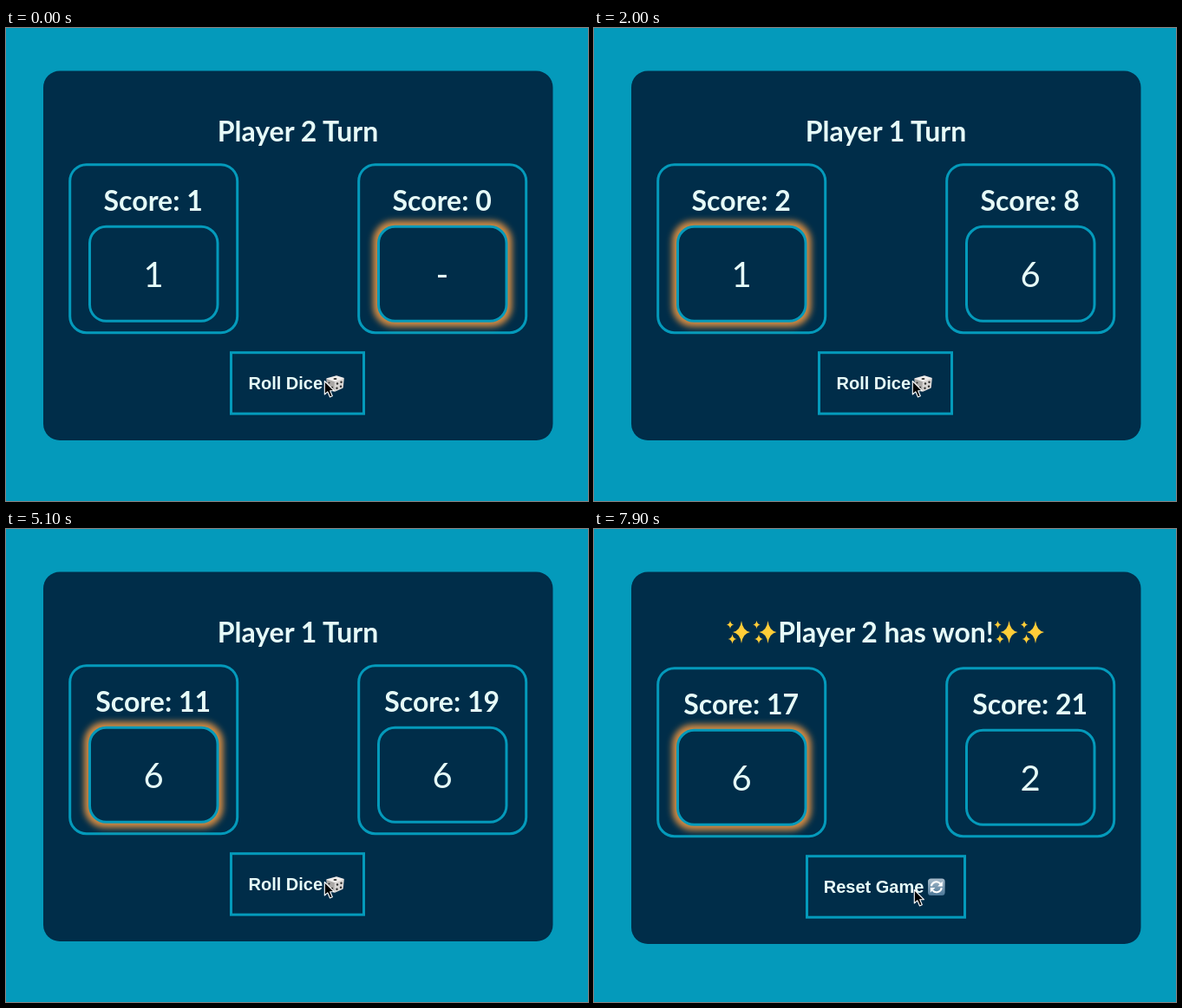
An HTML page for the animation above (8000 ms loop, 671 by 546 pixels).

```html
<!DOCTYPE html>
<html lang="en">
<head>
<meta charset="utf-8">
<title>Dice game</title>
<style>
  html, body { margin: 0; width: 100%; height: 100%; overflow: hidden; background: #049abb; }
  svg { display: block; }
  text { fill: #e6fbf8; text-anchor: middle; font: bold 32px Lato, sans-serif; }
  .die { font-weight: 400; font-size: 40px; }
  .label { font: bold 20px "Liberation Sans", Arial, sans-serif; text-anchor: start; }
  .line { fill: #002d49; stroke: #049abb; stroke-width: 3; }
  .glow { fill: #d18a42; filter: url(#blur); }
</style>
</head>
<body>
<svg width="671" height="546" viewBox="0 0 671 546">
  <defs>
    <filter id="blur" x="-20%" y="-20%" width="140%" height="140%"><feGaussianBlur stdDeviation="3.6"/></filter>
    <linearGradient id="steel" x2="0" y2="1"><stop stop-color="#a9bccb"/><stop offset="1" stop-color="#4c7798"/></linearGradient>
    <path id="star" d="M0-13Q1.5-1.5 10 0Q1.5 1.5 0 13Q-1.5 1.5-10 0Q-1.5-1.5 0-13Z"/>
    <g id="sparkle" fill="#ffcd38">
      <use href="#star"/>
      <use href="#star" transform="translate(-13 -8.5) scale(.42 .36)"/>
      <use href="#star" transform="translate(-10.5 8) scale(.5 .42)"/>
    </g>
    <g id="player">
      <rect class="line" x="73.7" y="157.7" width="193" height="194" rx="19"/>
    </g>
  </defs>

  <rect id="card" x="43" y="49.5" width="587.5" height="426.5" rx="19" fill="#002d49"/>
  <text id="title" x="336.5" y="130.5"></text>
  <g id="sparkles">
    <use href="#sparkle" x="170" y="119"/><use href="#sparkle" x="200.5" y="119"/>
    <use href="#sparkle" x="478.5" y="119"/><use href="#sparkle" x="509" y="119"/>
  </g>

  <g id="board">
    <g class="player"></g>
    <g class="player" transform="translate(333)"></g>

    <g id="roll">
      <rect class="line" x="259.5" y="374.7" width="153" height="70.5"/>
      <text class="label" x="279.5" y="417">Roll Dice</text>
      <g stroke-linejoin="round" stroke-width="1.5">
        <path d="M370 405L381 402L389 404.5L379 408.5Z" fill="#f0eeec" stroke="#f0eeec"/>
        <path d="M370 406L378.500 409L378 419L371 414Z" fill="#aaa7a5" stroke="#aaa7a5"/>
        <path d="M379.500 409L389 405.500L388 415L379 419Z" fill="#d8d5d3" stroke="#d8d5d3"/>
      </g>
      <g fill="#30302f">
        <ellipse cx="379.500" cy="405" rx="2" ry="1"/>
        <circle cx="372.500" cy="409.500" r="1.100"/><circle cx="376" cy="414.800" r="1.100"/>
        <circle cx="382" cy="410.500" r="1.200"/><circle cx="386.500" cy="408.800" r="1.200"/>
        <circle cx="381.500" cy="415.800" r="1.200"/><circle cx="386" cy="413.800" r="1.200"/>
      </g>
    </g>

    <g id="reset">
      <rect class="line" x="245.5" y="374.7" width="182" height="70.5"/>
      <text class="label" x="264.7" y="417">Reset Game</text>
      <g transform="translate(394.8 410.3)">
        <rect x="-9.8" y="-9.800" width="19.600" height="19.600" rx="3.500" fill="url(#steel)"/>
        <g id="arrow">
          <path d="M-6-1A6 6 0 0 1 4.500-3.800" fill="none" stroke="#fff" stroke-width="2"/>
          <path d="M7-6.500V-.8H1.400Z" fill="#fff"/>
        </g>
        <use href="#arrow" transform="rotate(180)"/>
      </g>
    </g>
  </g>

  <path id="cursor" d="M0 0V15.500L3.500 12.300L6.200 18.500L9 17.300L6.400 11.300H11.200Z" fill="#000" stroke="#fff" stroke-width="1.100" stroke-linejoin="round"/>
</svg>
<script>
const LOOP = 8000, GOAL = 20;
const rolls = [ // [time, player, value]
  [100, 1, 2], [1100, 0, 1], [1800, 1, 6], [2700, 0, 3], [3500, 1, 5],
  [4400, 0, 6], [5000, 1, 6], [5800, 0, 6], [6500, 1, 2]
];
const $ = id => document.getElementById(id);
const show = (el, on) => el.setAttribute("visibility", on ? "visible" : "hidden");

const players = [...document.querySelectorAll(".player")].map(g => {
  g.innerHTML = `<use href="#player"/>
    <text x="169.700" y="210.500"></text>
    <rect class="glow" x="90" y="222.500" width="160.500" height="122.500" rx="24"/>
    <rect class="line" x="96.500" y="229.300" width="147.500" height="109" rx="19"/>
    <text class="die" x="170" y="298.500"></text>`;
  const [score, die] = g.querySelectorAll("text");
  return { score, die, glow: g.querySelector(".glow") };
});

function draw(t) {
  const scores = [1, 0], dice = [1, "-"];
  let turn = 1, won = false;
  for (const [time, who, value] of rolls) {
    if (t < time) break;
    scores[who] += value;
    dice[who] = value;
    won = scores[who] > GOAL;
    turn = 1 - who;
  }
  players.forEach((p, i) => {
    p.score.textContent = "Score: " + scores[i];
    p.die.textContent = dice[i];
    show(p.glow, i === turn);
  });
  $("title").textContent = won ? "Player 2 has won!" : `Player ${turn + 1} Turn`;
  show($("sparkles"), won);
  show($("roll"), !won);
  show($("reset"), won);
  $("card").setAttribute("height", won ? 429.5 : 426.5);
  $("board").setAttribute("transform", `translate(0 ${won ? 3 : 0})`);

  const drift = Math.min(1, Math.max(0, (t - 7600) / 300));
  $("cursor").setAttribute("transform", `translate(${367.3 + 2 * drift} ${407.5 + 9 * drift})`);
}

function frame() {
  draw(performance.now() % LOOP);
  requestAnimationFrame(frame);
}
frame();
</script>
</body>
</html>
```
